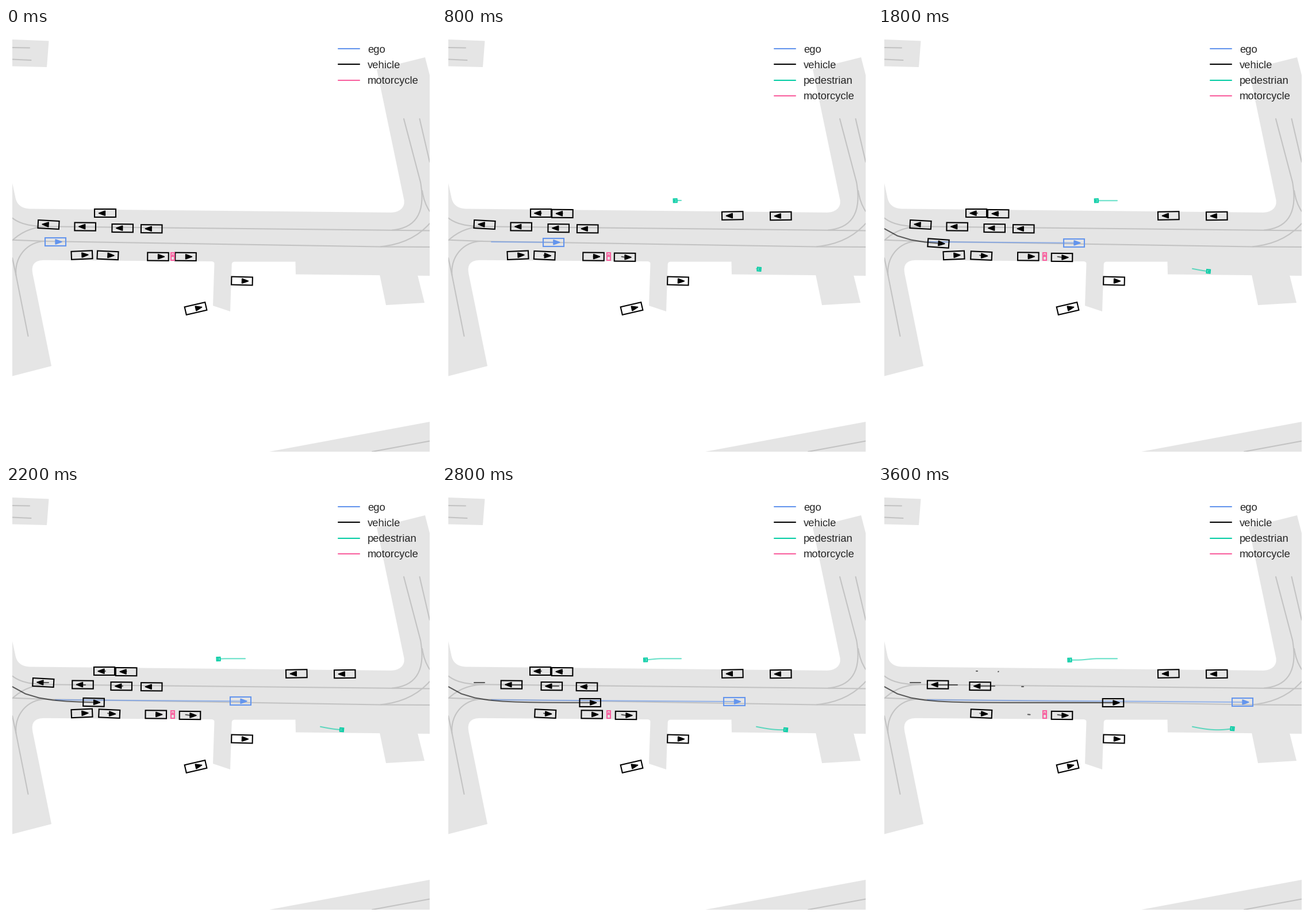
Animation, 748 px wide and 748 px high, one loop 3.8 s. Source, as a matplotlib script:

```python
import numpy as np
import matplotlib.pyplot as plt
from matplotlib.animation import FuncAnimation
from matplotlib.patches import PathPatch, Polygon
from matplotlib.path import Path

SIZE, DPI = 748, 100
LEFT, RIGHT = 11, 737
FRAMES, STEP_MS = 19, 200
LAST = FRAMES - 1
LW = 1.5

ROAD, LANE, TEXT = "#e5e5e5", "#c3c3c3", "#262626"
# kind: colour, box length, box width
KINDS = {
    "ego": ("#6495ed", 36.5, 14),
    "vehicle": ("#000000", 36.5, 14),
    "pedestrian": ("#06cda5", 6, 6),
    "motorcycle": ("#f9609f", 13, 5.5),
}

plt.rcParams["font.family"] = "Liberation Sans"
fig = plt.figure(figsize=(SIZE / DPI, SIZE / DPI), dpi=DPI, facecolor="white")
span = (RIGHT - LEFT) / SIZE
ax = fig.add_axes([LEFT / SIZE, LEFT / SIZE, span, span])
ax.set_xlim(LEFT, RIGHT)
ax.set_ylim(RIGHT, LEFT)
ax.axis("off")


def make_path(*parts):
    """A part is a point (line) or a list of 2 or 3 points (Bezier curve)."""
    kinds = {1: Path.LINETO, 2: Path.CURVE3, 3: Path.CURVE4}
    codes, points = [], []
    for part in parts:
        pts = part if isinstance(part, list) else [part]
        codes += [kinds[len(pts)]] * len(pts)
        points += pts
    codes[0] = Path.MOVETO
    return Path(points, codes)


def road(*parts):
    ax.add_patch(PathPatch(make_path(*parts), fc=ROAD, ec="none", zorder=1))


def lane(*parts):
    ax.add_patch(PathPatch(make_path(*parts), fc="none", ec=LANE, lw=LW,
                           capstyle="round", zorder=2))


def draw_map():
    # Main street with its side arms
    road((11, 270), (16, 293), [(19, 314), (42, 314.5)], (668, 321),
         [(683, 321.5), (696, 313), (692, 297)], (645, 72), (729, 51),
         (737, 82), (737, 431), (504, 428.5), (503.5, 406.5), (398, 406.5),
         [(393, 406.5), (392.7, 411)], (390, 493), (360, 483), (362.5, 410),
         [(362.5, 406.5), (358, 406)], (68, 403.8),
         [(41, 403), (46.5, 428)], (79, 588), (11, 605.5))
    road((650, 429), (661, 482), (728, 478), (716, 430))
    # Corners of the map
    road((11, 20), (74.5, 22.5), (71, 68), (11, 66.5))
    road((458, 737), (737, 685), (737, 737))
    lane((11, 34), (41, 34.5))
    lane((11, 54.5), (43.5, 56))
    lane((637, 737), (737, 718.5))
    # Through lanes
    lane((11, 330.5), [(28, 344), (62, 345.2)], (737, 352.5))
    lane((11, 368.7), (70, 371), (650, 380.5), (737, 381))
    # Turns at the west end
    lane((11, 369.5), [(36, 346), (72, 345.3)])
    lane((72, 371), [(40, 369), (14, 396), (17.5, 430)])
    lane((11, 400), (18, 433), (38.5, 536))
    # Turns at the east end
    lane((692, 158), (721, 268), [(735, 346), (672, 351.5)])
    lane((719.5, 158), (737, 233))
    lane((724, 283), [(727, 304), (737, 319)])
    lane((737, 340), [(706, 375), (652, 380.3)])


def smooth(u):
    u = np.clip(u, 0, 1)
    return u * u * (3 - 2 * u)


def settle(x, y, dx=0, dy=0, frames=8):
    """Stand still, apart from an eased drift by (dx, dy)."""
    return lambda t: (x + dx * smooth(t / frames), y + dy * smooth(t / frames))


def pull_away(x, y, start, speed):
    """Wait, then roll west at a steady speed."""
    return lambda t: (x - speed * np.maximum(0, t - start), y + 0 * t)


def cruise(t):
    x = np.interp(t, [0, 2, 9, 14, 18], [86, 135, 341, 508.5, 634])
    return x, 372 + (x - 86) * 0.0073


def merge(t):
    x = np.interp(t, [5, 12, 14, 18], [10, 176.3, 257.7, 409])
    return x, 377 - 30 * np.exp((8 - x) / 39)


def walk_west(t):
    x = 416 - 5.16 * (t - 2)
    return x, 300.3 + 2.4 * smooth((382 - x) / 35)


def walk_east(t):
    x = 547 + 4.63 * (t - 3)
    return x, 418.7 + 5.5 * np.sin(np.pi * (x - 547) / 88)


class Agent:
    """Moves by move(t); tilt is in degrees, clockwise on screen."""

    def __init__(self, kind, move, tilt=0, first=0, last=LAST, steer=False):
        self.first, self.last = first, last
        t = np.arange(first, last + 1.0)
        x, y = np.broadcast_arrays(*move(t))
        self.points = np.column_stack([x, y])
        self.angle = np.full(len(t), np.radians(tilt))
        if steer:
            self.angle += np.arctan2(np.gradient(y), np.gradient(x))

        color, length, width = KINDS[kind]
        a, b = length / 2, width / 2
        self.box_shape = np.array([(-a, -b), (a, -b), (a, b), (-a, b)])
        self.tip_shape = np.array([(0, -0.6 * b), (0.62 * a, 0), (0, 0.6 * b)])
        self.trail, = ax.plot([], [], color=color, alpha=0.6, lw=LW, zorder=3,
                              solid_capstyle="round", solid_joinstyle="round")
        self.box = ax.add_patch(Polygon(self.box_shape, fc="none", ec=color,
                                        lw=LW, zorder=4))
        self.tip = ax.add_patch(Polygon(self.tip_shape, fc=color, ec=color,
                                        lw=1, zorder=4))

    def show(self, frame):
        seen = frame >= self.first
        alive = seen and frame <= self.last
        self.trail.set_visible(seen)
        self.box.set_visible(alive)
        self.tip.set_visible(alive)
        if seen:
            past = self.points[:frame - self.first + 1]
            self.trail.set_data(past[:, 0], past[:, 1])
        if alive:
            angle = self.angle[frame - self.first]
            c, s = np.cos(angle), np.sin(angle)
            turn = np.array([(c, s), (-s, c)])
            self.box.set_xy(self.box_shape @ turn + past[-1])
            self.tip.set_xy(self.tip_shape @ turn + past[-1])


def make_agents():
    def car(move, tilt, **options):
        return Agent("vehicle", move, tilt, **options)

    return [
        Agent("ego", cruise),
        # Westbound queue
        car(pull_away(74, 342, 9, 4.6), 183, last=13),
        car(pull_away(137.7, 345.6, 10, 4.2), 180.5),
        car(pull_away(202.7, 348.2, 10.4, 3.3), 180.5),
        car(pull_away(253.2, 349.3, 13, 1.2), 180.5, last=16),
        # North kerb
        car(settle(172.5, 322.2, -1.5), 180, last=14),
        car(settle(209.7, 322.6, -0.6, 0.5), 180.5, first=1, last=15),
        car(settle(505.3, 326.5), 179, first=1),
        car(settle(589.3, 327), 179.3, first=1),
        # South kerb and side lot
        car(settle(132, 395, 0, 0.4), -2.5, last=11),
        car(settle(177, 395.4, 2.7, 0.7), 2.5),
        car(settle(264.5, 397.7, -3.8, -0.3, frames=12), 0.5, last=15),
        car(settle(312.5, 397.8, 7.5, 1.2, frames=6), 0.5),
        car(settle(410.5, 440), 1.5),
        car(settle(330, 488), -13),
        car(merge, 0, first=5, steer=True),
        Agent("motorcycle", settle(290, 397.5), -90),
        Agent("pedestrian", walk_west, 178, first=2),
        Agent("pedestrian", walk_east, 5, first=3),
    ]


def legend_row(kind):
    line, = ax.plot([578, 614.7], [0, 0], color=KINDS[kind][0], lw=LW,
                    solid_capstyle="round", zorder=8)
    label = ax.text(629.2, 0, kind, color=TEXT, size=13.2, va="baseline",
                    zorder=8)
    return line, label


draw_map()
agents = make_agents()
legend = {kind: legend_row(kind) for kind in KINDS}


def update(frame):
    for agent in agents:
        agent.show(frame)
    y = 36.25
    for kind, (line, label) in legend.items():
        shown = kind != "pedestrian" or frame >= 2
        line.set_visible(shown)
        label.set_visible(shown)
        line.set_ydata([y, y])
        label.set_y(y + 6.42)
        y += 27.17 * shown
    return []


anim = FuncAnimation(fig, update, frames=FRAMES, interval=STEP_MS,
                     init_func=lambda: update(0), repeat=True, repeat_delay=0)
plt.show()
```
